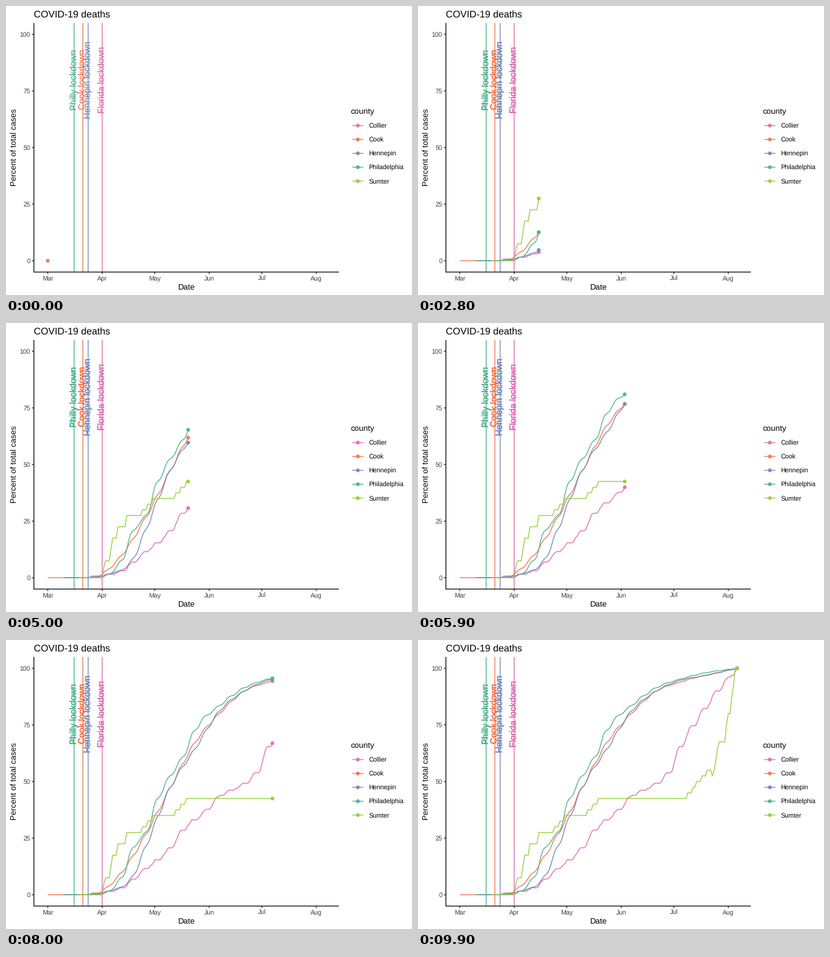
A matplotlib script that plays this animation: 672x480 px, repeating every 10 s.

```python
import matplotlib.pyplot as plt
import numpy as np
from matplotlib.animation import FuncAnimation
from matplotlib.patches import Circle

W, H, DPI = 672, 480, 96
FRAMES, INTERVAL = 100, 100
LAST = 158  # days from 1 March to 6 August
LEFT, RIGHT, TOP, BOTTOM = 46.2, 551.0, 28.2, 441.9
PX = 72 / DPI

PINK, ORANGE, BLUE = "#e072b6", "#f67a50", "#788dbf"
TEAL, GREEN = "#53b594", "#98d13f"

plt.rcParams.update({
    "font.family": "Liberation Sans",
    "text.hinting": "none",
    "path.snap": False,
    "lines.solid_capstyle": "butt",
    "lines.solid_joinstyle": "round",
})


def px(day):
    return LEFT + (day + .05 * LAST) * (RIGHT - LEFT) / (1.1 * LAST)


def py(percent):
    return BOTTOM - (percent + 5) * (BOTTOM - TOP) / 110


def hermite(t, at, value):
    """Smooth curve through the key points."""
    slope = np.gradient(value, at)
    i = np.clip(np.searchsorted(at, t, side="right") - 1, 0, len(at) - 2)
    h = at[i + 1] - at[i]
    u = (t - at[i]) / h
    return (value[i] * (1 + 2 * u) * (1 - u) ** 2
            + value[i + 1] * u ** 2 * (3 - 2 * u)
            + h * u * (1 - u) * (slope[i] * (1 - u) - slope[i + 1] * u))


def weekly(start, depth, keys, deaths=None):
    """Rising curve that slows once a week, when fewer deaths are reported."""
    at, value = np.array(keys, float).T
    days = np.arange(start, LAST + 1)
    t = days - depth * 7 / (2 * np.pi) * np.sin(2 * np.pi * days / 7)
    percent = hermite(np.clip(t, at[0], at[-1]), at, value)
    percent = np.maximum.accumulate(np.clip(percent, 0, 100))
    if deaths:
        percent = np.round(percent / 100 * deaths) / deaths * 100
    return days, percent


def whole(start, keys, deaths):
    """Straight runs between key points, in whole deaths."""
    days = np.arange(start, LAST + 1)
    percent = np.interp(days, *np.array(keys, float).T)
    return days, np.round(percent / 100 * deaths) / deaths * 100


SERIES = [
    ("Collier", PINK, weekly(9, 1, [
        (21, 0), (28, .7), (42, 2.9), (56, 11.5), (70, 20.9), (77, 28.4),
        (91, 37.7), (98, 43.5), (112, 49), (119, 53.8), (126, 65.4),
        (140, 82.5), (147, 90), (158, 100)], deaths=130)),
    ("Cook", ORANGE, weekly(0, .5, [
        (21, 0), (28, .5), (35, 4), (42, 9.8), (56, 26.8), (70, 47.6),
        (84, 67.3), (98, 80.2), (112, 89.9), (126, 94), (158, 100)])),
    ("Hennepin", BLUE, weekly(11, .5, [
        (21, 0), (35, 1.6), (49, 8.9), (56, 21.5), (70, 47.5), (84, 64.5),
        (98, 81.2), (112, 90), (126, 94.8), (140, 96.8), (158, 100)])),
    ("Philadelphia", TEAL, weekly(9, .7, [
        (21, 0), (35, 1.7), (42, 7.6), (49, 21), (56, 27.7), (63, 42.8),
        (70, 52.6), (77, 60.9), (84, 72.7), (98, 83.6), (112, 91.4),
        (126, 95.3), (140, 98), (158, 100)])),
    ("Sumter", GREEN, whole(18, [
        (31, 0), (33, 7.5), (35, 7.5), (37, 17.5), (39, 17.5), (40, 22.5),
        (44, 22.5), (45, 27.5), (52, 27.5), (61, 35), (71, 35), (80, 42.5),
        (128, 42.5), (142, 55), (144, 52.5), (148, 67.5), (151, 67.5),
        (153, 80), (154, 80), (157, 100)], deaths=40)),
]
LOCKDOWNS = [("Philly", TEAL, 15), ("Cook", ORANGE, 20),
             ("Hennepin", BLUE, 23), ("Florida", PINK, 31)]
MONTHS = [("Mar", 0), ("Apr", 31), ("May", 61),
          ("Jun", 92), ("Jul", 122), ("Aug", 153)]

fig = plt.figure(figsize=(W / DPI, H / DPI), dpi=DPI, facecolor="white")
ax = fig.add_axes([0, 0, 1, 1])
ax.set(xlim=(0, W), ylim=(H, 0))
ax.axis("off")


def line(xs, ys, color, width=1.42, z=2):
    return ax.plot(xs, ys, color=color, lw=width * PX, zorder=z)[0]


def dot(x, y, color):
    return ax.add_patch(Circle((x, y), 3.1, fc=color, lw=0, zorder=3))


def label(x, y, s, size, color="black", ha="left", angle=0):
    return ax.text(x, y, s, size=size, color=color, ha=ha, va="baseline",
                   rotation=angle, rotation_mode="anchor", zorder=5)


# Axes and titles
line([LEFT, LEFT], [TOP, BOTTOM + .6], "black", 1.3, 6)
line([LEFT, RIGHT], [BOTTOM, BOTTOM], "black", 1.3, 6)
for name, day in MONTHS:
    line([px(day)] * 2, [BOTTOM, BOTTOM + 3.33], "#262626", 1.3)
    label(px(day), 456, name, 8, "#404040", "center")
for tick in range(0, 101, 25):
    line([LEFT - 3.33, LEFT], [py(tick)] * 2, "#262626", 1.3)
    label(40.3, py(tick) + 3.9, str(tick), 8, "#404040", "right")
label(LEFT, 18.9, "COVID-19 deaths", 12)
label((LEFT + RIGHT) / 2, 471.8, "Date", 10, ha="center")
label(16.5, (TOP + BOTTOM) / 2, "Percent of total cases", 10,
      ha="center", angle=90)

# Legend
label(570.9, 179.2, "county", 10)
for i, (name, color, _) in enumerate(SERIES):
    y = 198.6 + 23.04 * i
    line([573.2, 591.6], [y, y], color)
    dot(582.4, y, color)
    label(600.6, y + 4, name, 8)

# Each county that has started prints the lockdown labels again, bolder.
copies = [[] for _ in SERIES]
for name, color, day in LOCKDOWNS:
    line([px(day)] * 2, [TOP, BOTTOM], color, z=4)
for layer in copies:
    for name, color, day in LOCKDOWNS * 2:
        layer.append(label(px(day - 1) + 7.2, py(80), name + " lockdown",
                           11.04, color, "center", 90))

trails = [line([], [], color) for _, color, _ in SERIES]
heads = [dot(0, 0, color) for _, color, _ in SERIES]


def update(frame):
    today = min(int((frame + .5) * LAST / (FRAMES - 1)), LAST)
    for (_, _, (days, percent)), trail, head in zip(SERIES, trails, heads):
        n = int(np.sum(days <= today))
        xs, ys = px(days[:n]), py(percent[:n])
        trail.set_data(xs, ys)
        head.set_visible(n > 0)
        if n:
            head.center = xs[-1], ys[-1]
    active = sum(head.get_visible() for head in heads)
    for i, layer in enumerate(copies):
        for text in layer:
            text.set_visible(i < active)
    return trails + heads


anim = FuncAnimation(fig, update, frames=FRAMES, interval=INTERVAL,
                     repeat=True, blit=False)
plt.show()
```
